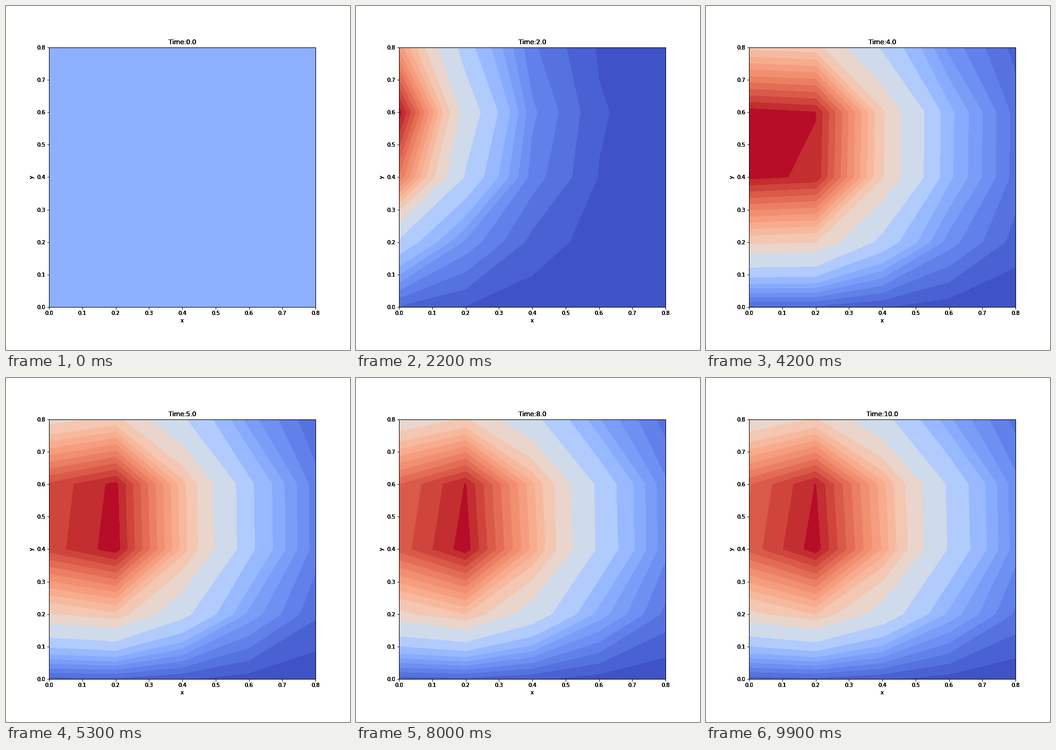
A matplotlib script for the animation above (10 s loop, 648x648 px).

```python
import numpy as np
import matplotlib.pyplot as plt
from matplotlib.animation import FuncAnimation

FRAMES, T_END = 100, 10.0
nodes = np.linspace(0, 0.8, 5)
n = np.arange(5)

# Band edges: wide around the pale middle, even towards both ends
m = np.arange(1, 13)
offset = 0.037 * m + 0.085 * np.tanh((m / 2) ** 2)
inner = np.concatenate([0.45 - offset, 0.45 + offset])
edges = np.sort(np.append(inner[(inner > 0) & (inner < 1)], [0, 1]))
cmap = plt.get_cmap("coolwarm")
colors = cmap((edges[:-1] + edges[1:]) / 2)
edges[[0, -1]] += [-0.01, 0.01]


def field(t):
    """Heat entering from the left and settling, scaled to 0..1."""
    s = np.exp(-0.9 * (t - 2.22))
    center = 0.75 - 1.75 * s
    decay = 0.24 + 0.105 * np.exp(-0.45 * (t - 2.22))
    across = np.exp(-decay * abs(n - center) ** 1.7)

    lift = min(s, 1)
    crest = 2.45 + 0.45 * lift
    up = 0.065 + 0.935 * np.sin(np.pi * n / (2 * crest)) ** (1 + 0.7 * lift)

    z = np.outer(up, across)
    return (z - z.min()) / np.ptp(z)


plt.rcParams.update({"font.family": "DejaVu Sans", "font.size": 10,
                     "axes.titlesize": 12})
fig = plt.figure(figsize=(9, 9), dpi=72, facecolor="white")
box = [0.125, 0.125, 0.775, 0.755]
# Stacked axes give the text and lines their hard, dark edges
layers = [fig.add_axes(box, label=str(k), zorder=k) for k in range(5)]
for ax in layers:
    ax.set(xlim=(0, 0.8), ylim=(0, 0.8), xlabel="x", ylabel="y")
    ax.set_xticks(np.arange(9) / 10)
    ax.set_yticks(np.arange(9) / 10)
    ax.patch.set_visible(ax is layers[0])
base = layers[0]
base.set_facecolor(cmap(0.25))
bands = []


def update(i):
    t = T_END * i / (FRAMES - 1)
    while bands:
        bands.pop().remove()
    if i:
        bands.append(base.contourf(nodes, nodes, field(t), levels=edges,
                                   colors=colors))
    for ax in layers:
        ax.set_title(f"Time:{round(t):.1f}")
    return []


anim = FuncAnimation(fig, update, frames=FRAMES, interval=100,
                     init_func=lambda: update(0), repeat=True, repeat_delay=0)
plt.show()
```
